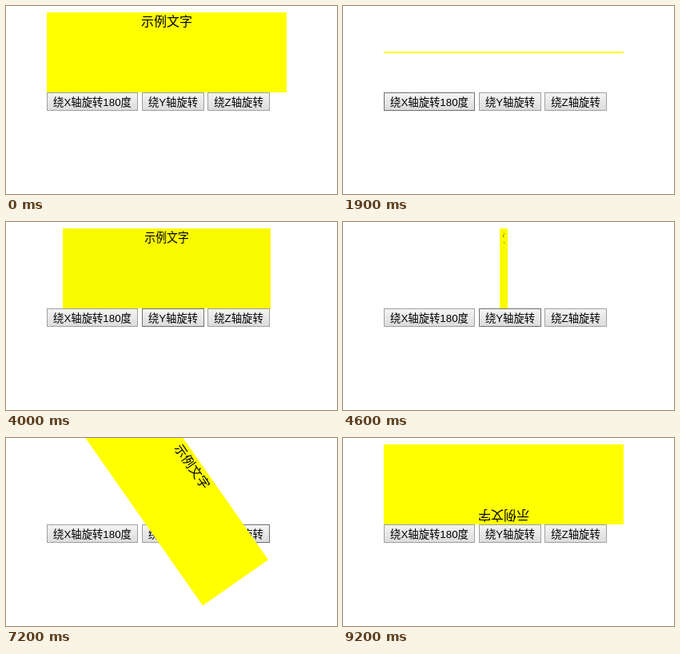
An HTML page for the animation above (9700 ms loop, 414 by 235 pixels).

```html
<!DOCTYPE html>
<html lang="zh">
<head>
<meta charset="utf-8">
<style>
html, body { margin: 0; width: 100%; height: 100%; overflow: hidden; background: #fff; }
body { position: relative; color: #000; font-family: "Liberation Sans", "Noto Sans CJK SC", "Noto Sans CJK", sans-serif; }
div { position: absolute; text-align: center; white-space: nowrap; line-height: 23px; }
#box { left: 51px; top: 8px; width: 300px; height: 100px; font-size: 16px; }
.btn {
  top: 108px; height: 23px; box-sizing: border-box; font-size: 13.333px;
  border: 1px solid #a0a0a0; background: linear-gradient(#f4f4f4, #dcdcdc);
}
.hover { border-color: #707070; }
.down { background: linear-gradient(#dcdcdc, #f0f0f0); }
</style>
</head>
<body>
<div class="btn" style="left:51px;width:114px">绕X轴旋转180度</div>
<div class="btn" style="left:170px;width:78px">绕Y轴旋转</div>
<div class="btn" style="left:252px;width:78px">绕Z轴旋转</div>
<div id="box">示例文字</div>
<script>
const LOOP = 9700, STEP = 100;
const box = document.getElementById('box');
const buttons = document.querySelectorAll('.btn');

// One turn per button: hover span, press time, and [time, degrees] keys
const turns = [
  { axis: 'X', hover: [800, 3400], press: 1000, keys: [[1000, 0], [1900, 91.15], [2700, 180]] },
  { axis: 'Y', hover: [3500, 6000], press: 3800, keys: [[3700, 1], [4600, 88.1], [5400, 165.4], [5600, 180]] },
  { axis: 'Z', hover: [6300, 9200], press: 6700, keys: [[6700, 5], [7200, 55], [8400, 180]] }
];

function angleAt(keys, t) {
  const i = keys.findIndex(k => k[0] > t);
  if (i < 0) return keys[keys.length - 1][1];
  if (i === 0) return keys[0][1];
  const [t0, a0] = keys[i - 1], [t1, a1] = keys[i];
  return a0 + (a1 - a0) * (t - t0) / (t1 - t0);
}

function draw(now) {
  const t = Math.floor(now % LOOP / STEP) * STEP;
  let transform = 'none';
  turns.forEach(({ axis, hover, press, keys }, i) => {
    buttons[i].classList.toggle('hover', t >= hover[0] && t < hover[1]);
    buttons[i].classList.toggle('down', t === press);
    if (t >= press) transform = `rotate${axis}(${angleAt(keys, t)}deg)`;
  });
  box.style.transform = transform;
  box.style.background = t >= 2000 && t < 6700 ? '#fafa00' : '#ff0';
}

const start = performance.now();
function tick() {
  draw(performance.now() - start);
  requestAnimationFrame(tick);
}
tick();
</script>
</body>
</html>
```
